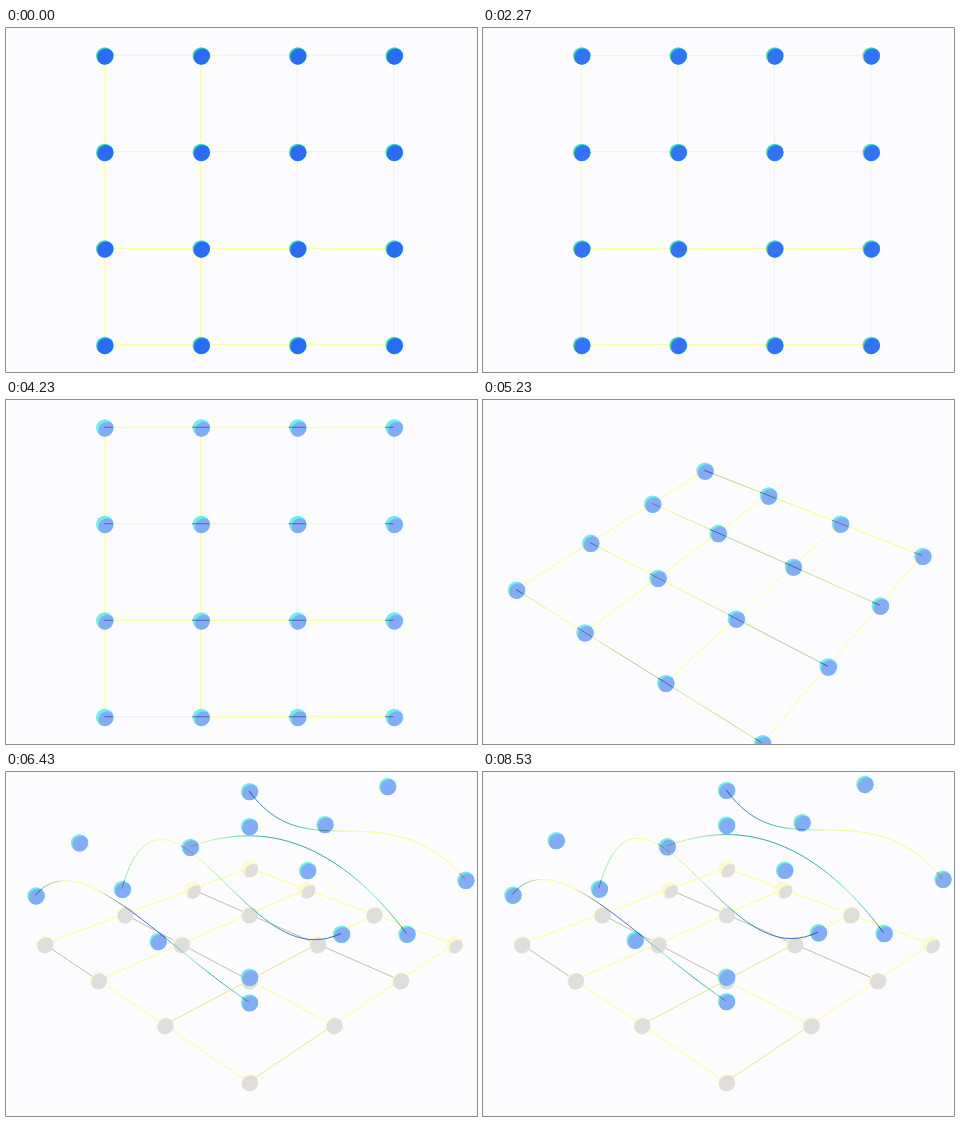
Recreate the animation shown at these times as an HTML page with a canvas. Size 471 px wide and 344 px high, loop 8.56 s.

```html
<!DOCTYPE html>
<html lang="en">
<head>
<meta charset="utf-8">
<title>Bezier surface</title>
<style>
  html, body { margin: 0; width: 100%; height: 100%; overflow: hidden; background: #fcfcff; }
  canvas { display: block; width: 471px; height: 344px; }
</style>
</head>
<body>
<canvas id="stage"></canvas>
<script>
const W = 471, H = 344, LOOP = 8560, EASE_MS = 1600;
const FADE_AT = 1740, TURN_AT = 4240, RISE_AT = 5160;
const CX = 243, CY = 172, CELL = 96.5, DIST = 620, DOT = 8.7;
const TILT = 61.4 * Math.PI / 180, YAW = Math.PI / 4;

// Heights in cells, one row per curve
const heights = [
  [1.05, 0.26, 1.48, 0.73],
  [0.56, 1.05, 1.30, 0.50],
  [0.32, 2.20, 0.04, 0.875],
  [0.56, 1.37, 0.81, 0.715]
];

// Line colours by letter, one letter per cell edge
const tones = {
  y: [255, 255, 140], g: [238, 238, 244], d: [192, 189, 178], o: [232, 231, 130]
};
const rowTones = [
  ['ggg', 'yyy', 'yyy'], ['ggg', 'ggg', 'ddd'],
  ['yyy', 'yyy', 'ddy'], ['yyy', 'gyy', 'dyy']
];
const colTones = [
  ['yyy', 'yyy', 'yyy'], ['yyy', 'yyy', 'yyy'],
  ['ggg', 'ggg', 'yoo'], ['ggg', 'ggg', 'yyo']
];
const inks = { B: '#3f72cc', T: '#35a5a8', G: '#86ecb4', Y: '#fbfb80' };
const curveInks = ['BTGYYYY', 'YGTTTGT', 'GYYGTBB', 'TYYBBGTG'];

const canvas = document.getElementById('stage');
const ctx = canvas.getContext('2d');
const dpr = window.devicePixelRatio || 1;
canvas.width = W * dpr;
canvas.height = H * dpr;

const ids = [0, 1, 2, 3];
const grid = ids.flatMap(j => ids.map(i => [i, j]));

function ease(t, start) {
  const x = Math.min(1, Math.max(0, (t - start) / EASE_MS));
  return x < 0.5 ? 8 * x ** 4 : 1 - 8 * (1 - x) ** 4;
}

const mix = (a, b, k) => a.map((v, n) => v + (b[n] - v) * k);
const css = c => `rgb(${c.map(Math.round).join(',')})`;

function bezier([a, b, c, d], t) {
  const s = 1 - t;
  return a * s ** 3 + 3 * b * s * s * t + 3 * c * s * t * t + d * t ** 3;
}

function camera(turn) {
  const yaw = YAW * turn, el = Math.PI / 2 - TILT * turn;
  const cy = Math.cos(yaw), sy = Math.sin(yaw);
  const ce = Math.cos(el), se = Math.sin(el);
  return (i, j, h = 0) => {
    const x = (i - 1.5) * CELL, y = (1.5 - j) * CELL, z = h * CELL;
    const u = x * cy + y * sy, v = y * cy - x * sy;
    const depth = 1 + (v * ce - z * se) / DIST;
    return [CX + u / depth, CY - (v * se + z * ce) / depth];
  };
}

function disc(x, y, r, fill) {
  ctx.beginPath();
  ctx.arc(x, y, r, 0, 2 * Math.PI);
  ctx.fillStyle = fill;
  ctx.fill();
}

// A disc with a bright crescent at the upper left
function dot([x, y], body, rim, shift) {
  x += 0.5;
  y += 0.7;
  ctx.save();
  disc(x, y, DOT, rim);
  ctx.clip();
  disc(x + shift, y + shift, DOT, body);
  ctx.restore();
}

function edge(a, b, states, k, at) {
  let c = mix(tones[states[0][k]], tones[states[1][k]], at.fade);
  c = mix(c, tones.y, at.turn);
  c = mix(c, tones[states[2][k]], at.rise);
  ctx.strokeStyle = css(c);
  ctx.beginPath();
  ctx.moveTo(...a);
  ctx.lineTo(...b);
  ctx.stroke();
}

function curve(project, j, rise) {
  const path = new Path2D();
  for (let n = 0; n <= 48; n++) {
    const t = n / 48;
    path.lineTo(...project(3 * t, j, bezier(heights[j], t) * rise));
  }
  return path;
}

function curveInk(project, j, rise) {
  const [x0] = project(0, j, heights[j][0] * rise);
  const [x1] = project(3, j, heights[j][3] * rise);
  const ink = ctx.createLinearGradient(x0, 0, x1, 0);
  [...curveInks[j]].forEach((c, n, all) => ink.addColorStop(n / (all.length - 1), inks[c]));
  return ink;
}

function draw(t) {
  const at = { fade: ease(t, FADE_AT), turn: ease(t, TURN_AT), rise: ease(t, RISE_AT) };
  const project = camera(at.turn);

  ctx.setTransform(dpr, 0, 0, dpr, 0, 0);
  ctx.fillStyle = '#fcfcff';
  ctx.fillRect(0, 0, W, H);
  ctx.lineWidth = 1;

  for (const n of ids) {
    for (let k = 0; k < 3; k++) {
      edge(project(k, n), project(k + 1, n), rowTones[n], k, at);
      edge(project(n, k), project(n, k + 1), colTones[n], k, at);
    }
  }

  if (at.rise > 0) {
    ctx.globalAlpha = 0.8;
    for (const [i, j] of grid) {
      dot(project(i, j), '#dad8e2', '#fbf9c4', i + j < 2 || i === 3 && !j ? 4 : 1.2);
    }
    ctx.globalAlpha = 1;
  }

  const tops = grid.map(([i, j]) => project(i, j, heights[j][i] * at.rise));
  const body = css(mix([42, 108, 250], [130, 172, 246], at.fade));
  const rim = css(mix([40, 222, 190], [104, 240, 234], at.fade));
  const shift = 1.2 + at.fade * (1 - 0.7 * at.turn) * 1.3;
  tops.forEach(p => dot(p, body, rim, shift));

  const curves = ids.map(j => curve(project, j, at.rise));
  ctx.globalAlpha = at.turn * (0.45 + 0.55 * at.rise);
  curves.forEach((path, j) => {
    ctx.strokeStyle = curveInk(project, j, at.rise);
    ctx.stroke(path);
  });

  // Curves read darker where they cross the dots
  ctx.save();
  ctx.beginPath();
  for (const [x, y] of tops) {
    ctx.moveTo(x + DOT, y);
    ctx.arc(x, y, DOT, 0, 2 * Math.PI);
  }
  ctx.clip();
  ctx.globalAlpha = at.fade * 0.75;
  ctx.strokeStyle = '#34509c';
  curves.forEach(path => ctx.stroke(path));
  ctx.restore();
  ctx.globalAlpha = 1;
}

const start = performance.now();
function tick() {
  draw((performance.now() - start) % LOOP);
  requestAnimationFrame(tick);
}
tick();
</script>
</body>
</html>
```
